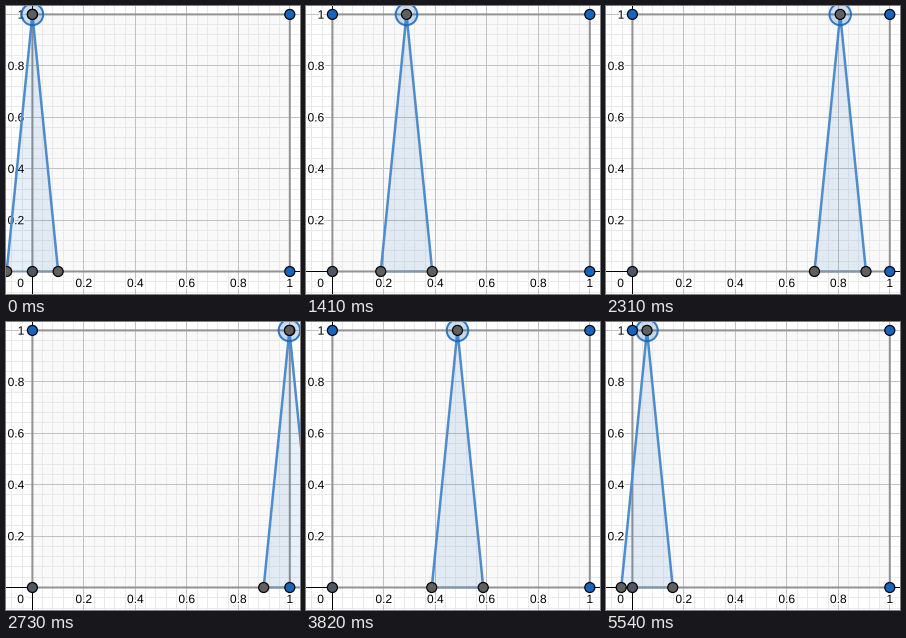
A matplotlib script that plays this animation: 294 px wide and 288 px high, repeating every 6.24 s.

```python
import numpy as np
import matplotlib.pyplot as plt
from matplotlib.animation import FuncAnimation
from matplotlib.patches import Circle
from matplotlib.patheffects import withStroke

W, H, DPI = 294, 288, 100
PX = 72 / DPI                      # one pixel in points
LOOP, TICK = 6240, 20
LEFT, RIGHT, TOP, BASE = 26.4, 283.8, 8.4, 265.5
UNIT_X, UNIT_Y = RIGHT - LEFT, BASE - TOP
HALF = 0.1 * UNIT_X

BLUE, DARK, SLATE, EDGE = "#1565c0", "#5f5f5f", "#4e5663", "#929292"

# Drag path of the apex: time (ms), x (px), speed (px per 100 ms)
PATH = [(710, LEFT, 0), (1410, 100.5, 15.5), (1910, 180, 15),
        (2010, 180, 15), (2730, 283.4, 0), (3430, 208.5, -14.5),
        (3820, 151.5, -13.5), (4120, 112.5, -12.5), (4520, 63.5, -12),
        (4840, 29, -6), (4940, 41, 0)]
# The picture only refreshes at these moments
REFRESH = [0, *range(810, 1911, 100), *range(2110, 2611, 100),
           *range(2730, 3431, 100), *range(3520, 4721, 100), 4840, 4940]


def apex_x(ms):
    t = max(r for r in REFRESH if r <= ms)
    if t <= PATH[0][0]:
        return PATH[0][1]
    for (t0, x0, v0), (t1, x1, v1) in zip(PATH, PATH[1:]):
        if t <= t1:
            span, u = (t1 - t0) / 100, (t - t0) / (t1 - t0)
            return ((2*u**3 - 3*u**2 + 1) * x0 + (3*u**2 - 2*u**3) * x1
                    + span * ((u**3 - 2*u**2 + u) * v0 + (u**3 - u**2) * v1))
    return PATH[-1][1]


fig = plt.figure(figsize=(W / DPI, H / DPI), dpi=DPI, facecolor="white")
ax = fig.add_axes([0, 0, 1, 1])
ax.set_xlim(0, W)
ax.set_ylim(H, 0)
ax.axis("off")


def crisp(v):
    """Centre of the pixel that holds v."""
    return np.floor(v) + 0.5


def grid(indices, color, z):
    k = np.array(indices) / 25
    style = dict(colors=color, linewidths=PX, zorder=z, snap=False)
    ax.vlines(crisp(LEFT + k * UNIT_X), 0, H, **style)
    ax.hlines(crisp(BASE - k * UNIT_Y), 0, W, **style)


def line(xs, ys, color, width, z):
    return ax.plot(xs, ys, color=color, lw=width * PX, zorder=z, snap=False,
                   solid_joinstyle="round")[0]


def disc(x, y, radius, fill, edge, width, z):
    return ax.add_patch(Circle((x, y), radius, fc=fill, ec=edge,
                               lw=width * PX, zorder=z, snap=False))


def dot(x, y, color, z):
    return disc(x, y, 5, color, "black", 1.2, z)


def label(x, y, text, ha):
    ax.text(x, y, text, ha=ha, va="baseline", family="Liberation Sans",
            size=12 * PX, color="black", zorder=4,
            path_effects=[withStroke(linewidth=3 * PX, foreground="white")])


# Square and grid
ax.fill([LEFT, RIGHT, RIGHT, LEFT], [TOP, TOP, BASE, BASE],
        color="#f9f9f9", lw=0, zorder=0)
grid([k for k in range(-2, 27) if k % 5], "#e9e9e9", 1)
grid(range(0, 26, 5), "#c0c2c4", 2)
line([0, W], [crisp(BASE)] * 2, "black", 1, 3)
line([crisp(LEFT)] * 2, [0, H], "black", 1, 3)
line([LEFT, RIGHT, RIGHT, LEFT, LEFT], [TOP, TOP, BASE, BASE, TOP], EDGE, 2, 5)

# Axis numbers
label(18, 281, "0", "right")
for i in range(1, 6):
    text = f"{i / 5:g}"
    label(LEFT + i / 5 * UNIT_X, 281, text, "center")
    label(18.4, BASE - i / 5 * UNIT_Y + 4.2, text, "right")

# Moving triangle
area, = ax.fill([0, 1, 2], [0, 1, 0], color=BLUE, alpha=0.1, lw=0, zorder=6)
sides = line([], [], "#4f8ccc", 2.5, 7)
bottom = line([], [], "#7f96b0", 2, 7)
halo = disc(0, 0, 10.75, (0.08, 0.4, 0.75, 0.22), (0.08, 0.4, 0.75, 0.85), 2, 8)

for x, y, color in [(LEFT, TOP, BLUE), (RIGHT, TOP, BLUE),
                    (RIGHT, BASE, BLUE), (LEFT, BASE, SLATE)]:
    dot(x, y, color, 9)
handles = [dot(0, 0, DARK, 10) for _ in range(3)]


def update(i):
    x = apex_x((i + 0.5) * TICK)
    corners = [(x - HALF, BASE), (x, TOP), (x + HALF, BASE)]
    xs, ys = zip(*corners)
    area.set_xy(corners)
    sides.set_data(xs, ys)
    bottom.set_data([xs[0], xs[2]], [BASE, BASE])
    halo.center = corners[1]
    for handle, corner in zip(handles, corners):
        handle.center = corner
    return [area, sides, bottom, halo, *handles]


anim = FuncAnimation(fig, update, frames=LOOP // TICK, interval=TICK,
                     repeat=True, repeat_delay=0)
plt.show()
```
